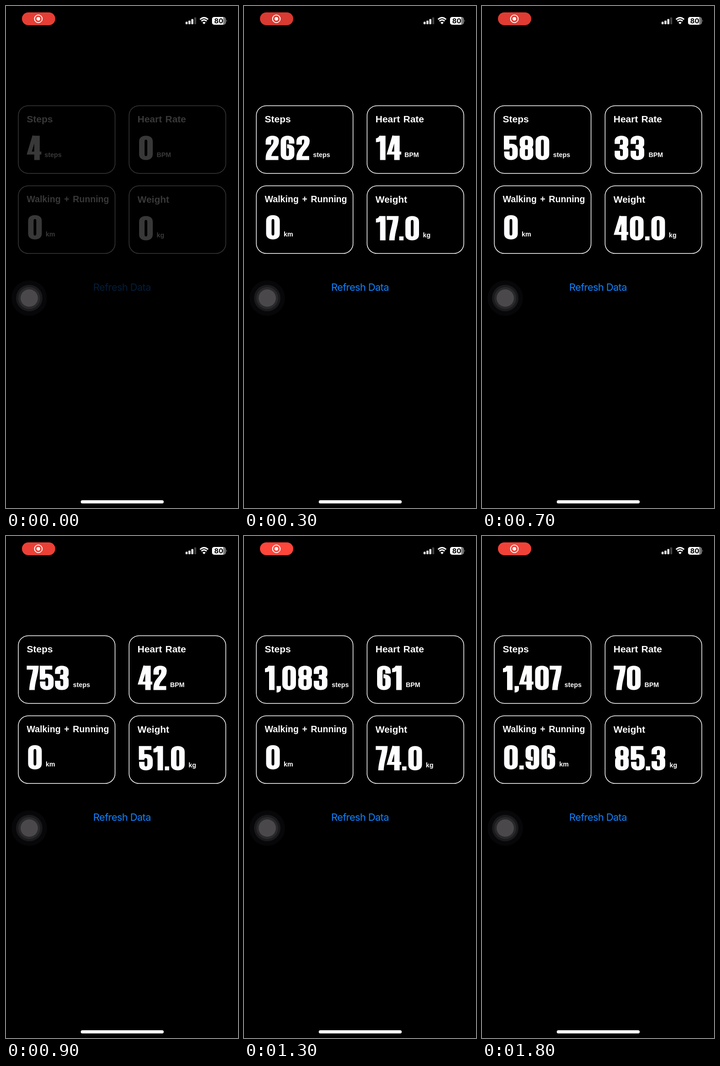
An HTML page for the animation above (1900 ms loop, 509x1100 px).

```html
<!DOCTYPE html>
<html lang="en">
<head>
<meta charset="utf-8">
<title>Health counters</title>
<style>
  html, body { margin: 0; width: 100%; height: 100%; overflow: hidden; background: #000; }
  svg { display: block; width: 100%; height: 100%; }
  .card text { font: bold 21px "Liberation Sans", Arial, sans-serif; fill: #fefdff; word-spacing: 1.5px; }
  .card .unit { font-size: 14.3px; }
  .card rect { fill: none; stroke: #fefdff; stroke-width: 1.5; }
  .num path { fill: none; stroke: #fefdff; }
  .refresh { font: 22px Inter, sans-serif; letter-spacing: -.65px; fill: #0f84ff; }
  .level { font: 700 15px Inter, sans-serif; }
</style>
</head>
<body>
<svg viewBox="0 0 509 1100">
  <rect id="pill" x="35" y="14" width="73" height="28" rx="14"/>
  <circle cx="71" cy="28" r="8.4" fill="none" stroke="#fff" stroke-width="1.9"/>
  <circle cx="71" cy="28" r="4" fill="#fff"/>

  <g fill="#fff">
    <rect x="394" y="34.5" width="4.4" height="5.5" rx="1.2"/>
    <rect x="400.3" y="32" width="4.4" height="8" rx="1.2"/>
    <rect x="406.6" y="28.5" width="4.4" height="11.5" rx="1.2"/>
    <rect x="412.9" y="25" width="4.4" height="15" rx="1.2" fill="#424242"/>
    <path d="M431 36.3Q434.5 33.3 438 36.3L434.5 40Z"/>
    <path d="M428.8 33Q434.5 28 440.2 33M425.7 29.5Q434.5 21.5 443.3 29.5" fill="none" stroke="#fff" stroke-width="3"/>
    <clipPath id="cell"><rect x="452" y="24" width="30.5" height="17" rx="5"/></clipPath>
    <g clip-path="url(#cell)">
      <path d="M452 24h31v17h-31z" fill="#777"/>
      <path d="M452 24h24.5v17H452z"/>
    </g>
    <path d="M483.5 30Q486 32.5 483.5 35Z" fill="#777"/>
    <text class="level" x="466.8" y="37.8" text-anchor="middle" fill="#000">80</text>
    <rect x="164" y="1083" width="182" height="7" rx="3.5"/>
  </g>

  <g id="content">
    <text class="refresh" x="254.5" y="624" text-anchor="middle">Refresh Data</text>
  </g>

  <g>
    <circle cx="51" cy="640" r="39" fill="#070608"/>
    <circle cx="51" cy="640" r="29" fill="#1a191b"/>
    <circle cx="51" cy="640" r="24" fill="#29282a"/>
    <circle cx="51" cy="640" r="19" fill="#4a484b"/>
  </g>
</svg>
<script>
// Condensed numerals: advance, pen path, pen width (drawn with y scaled by SQUASH)
const SQUASH = .72;
const GLYPHS = {
  0: [35, "M9 18Q9 6 18 6T27 18V56Q27 68 18 68T9 56Z"],
  1: [24, "M15.5 74V0M.5 14Q9 14 14 2"],
  2: [32, "M8 27V18Q8 6 17 6T25 18C25 36 8 42 8 68H30"],
  3: [35, "M8 25V17Q8 6 17 6T26 17V25Q26 34 13 34Q26 35 26 45V57Q26 68 17 68T8 57V46"],
  4: [32.5, "M21 74V0M24 74V0M17 0L5.5 53H32", 9],
  5: [34, "M30 6H8.5V42M9 39Q10 30.5 18 30.5T27 42V56Q27 68 18 68T9 56V48"],
  6: [35.5, "M27 24V18Q27 6 18 6T9 18V56Q9 68 18 68T27 56V42Q27 32 17 32"],
  7: [26, "M0 6H20C19 30 12 46 11.5 74"],
  8: [35, "M9 17Q9 6 18 6T27 17V25Q27 35 18 35T9 25ZM9 45Q9 35 18 35T27 45V57Q27 68 18 68T9 57Z"],
  9: [35, "M9 50V56Q9 68 18 68T27 56V18Q27 6 18 6T9 18V32Q9 42 19 42"],
  ".": [12, "M1.5 68H11"],
  ",": [11.5, "M2 66.5H11.5M7 66V72Q7 77 2 77", 9]
};

const content = document.getElementById("content");
const pill = document.getElementById("pill");

function add(parent, tag, attrs, text = "") {
  const el = document.createElementNS("http://www.w3.org/2000/svg", tag);
  for (const key in attrs) el.setAttribute(key, attrs[key]);
  el.textContent = text;
  return parent.appendChild(el);
}

// Returns a function that shows a value and puts the unit behind it
function makeCard(x, y, title, titleStyle, titleY, numX, numY, unit) {
  const card = add(content, "g", { class: "card" });
  add(card, "rect", { x, y, width: 212.3, height: 148.3, rx: 22 });
  add(card, "text", { x: x + 18.5, y: titleY, style: titleStyle }, title);
  const num = add(card, "g", { class: "num", role: "img",
    transform: `translate(${numX} ${numY}) scale(1 ${SQUASH})` });
  const label = add(card, "text", { class: "unit", y: numY + 47 }, unit);
  let shown;
  return value => {
    if (value === shown) return;
    shown = value;
    num.replaceChildren();
    num.setAttribute("aria-label", value);
    let pos = 0;
    [...value].forEach((ch, i) => {
      const [advance, d, pen = 12] = GLYPHS[ch];
      if (ch === "4" && value[i - 1] === "7") pos -= 2;
      add(num, "path", { d, "stroke-width": pen, transform: `translate(${pos})` });
      pos += advance;
    });
    label.setAttribute("x", numX + pos + 6.5);
  };
}

const showSteps = makeCard(27, 218.4, "Steps", "", 255.3, 45.5, 284.2, "steps");
const showHeart = makeCard(270, 218.4, "Heart Rate", "", 255.3, 289, 284.2, "BPM");
const showWalk = makeCard(27, 394, "Walking + Running",
  "font-size:19.6px;word-spacing:2.2px", 429.8, 45.5, 458.2, "km");
const showWeight = makeCard(270, 394, "Weight", "", 430.8, 289, 460.2, "kg");

const STEP_KEYS = [[0, 4], [3, 262], [5, 407], [9, 753], [13, 1083], [16, 1342], [17, 1407]];

function stepsAt(tick) {
  const i = STEP_KEYS.findIndex(key => key[0] > tick);
  if (i < 0) return 1407;
  const [t0, v0] = STEP_KEYS[i - 1], [t1, v1] = STEP_KEYS[i];
  return Math.floor(v0 + (v1 - v0) * (tick - t0) / (t1 - t0));
}

function draw(ms) {
  const tick = Math.floor(ms / 100);
  const done = tick >= 15;
  content.setAttribute("opacity", [.22, .68][tick] ?? 1);

  const glow = -Math.cos((tick - 4) * Math.PI / 10);
  pill.setAttribute("fill", `rgb(${236 + 20 * glow},${64 + 6 * glow},${54 + 5 * glow})`);

  const weight = Math.floor(tick * 5.75);
  showSteps(stepsAt(tick).toLocaleString("en-US"));
  showHeart(String(Math.min(70, Math.floor(tick * 4.75))));
  showWalk(done ? "0.96" : "0");
  showWeight(done ? "85.3" : weight ? weight + ".0" : "0");
}

const start = performance.now();
function loop() {
  draw((performance.now() - start) % 1900);
  requestAnimationFrame(loop);
}
loop();
</script>
</body>
</html>
```
